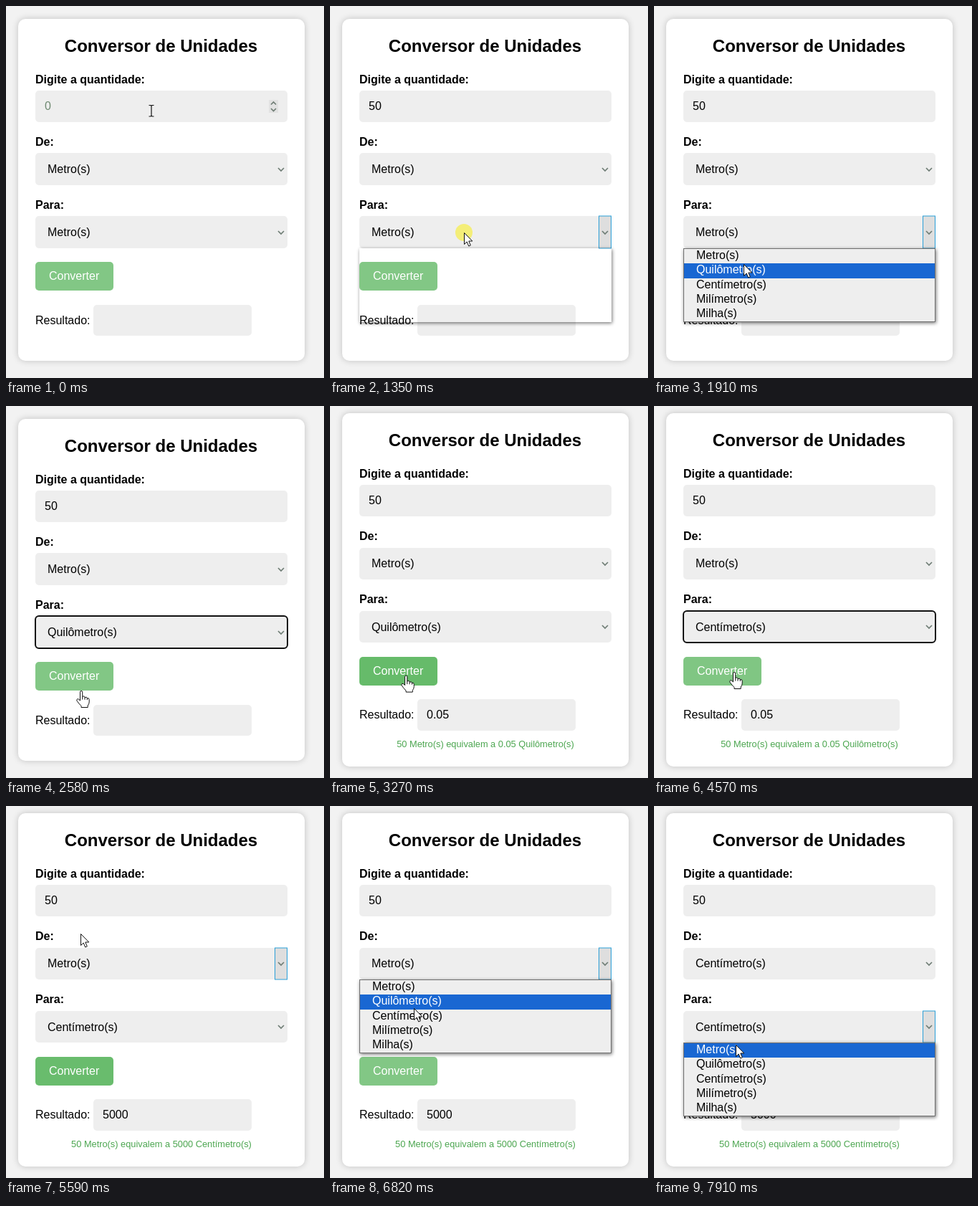
Write an HTML page that moves like this. It is 444 by 519 pixels and loops after 8 s.

```html
<!DOCTYPE html>
<html lang="pt">
<head>
<meta charset="utf-8">
<title>Conversor de Unidades</title>
<style>
  html, body { margin: 0; width: 100%; height: 100%; overflow: hidden; background: #f2f2f2; }
  svg { display: block; }
  text { font: 16px "Liberation Sans", Arial, sans-serif; fill: #000; }
  .bold { font-weight: bold; }
  .title { font-size: 24px; font-weight: bold; text-anchor: middle; }
  .note { font-size: 12.8px; fill: #4ca650; text-anchor: middle; }
  .light { fill: #fff; }
  .field { fill: #eee; }
  .chevron { fill: none; stroke: #6f7d75; stroke-width: 1.7; }
  .ring { fill: none; stroke: #101010; stroke-width: 2; }
  .arrow { fill: #dedede; stroke: #2a9fd8; }
</style>
</head>
<body>
<svg id="stage" width="444" height="519" viewBox="0 0 444 519">
  <defs>
    <filter id="soft" x="-10%" y="-10%" width="120%" height="120%"><feGaussianBlur stdDeviation="5"/></filter>
    <filter id="tight" x="-10%" y="-20%" width="120%" height="140%"><feGaussianBlur stdDeviation="2.5"/></filter>
    <clipPath id="outside"><path clip-rule="evenodd" d="M-20-20H372V123H-20ZM0 0V103H352V0Z"/></clipPath>
  </defs>
</svg>
<script>
const LOOP = 8000;
const UNITS = ['Metro(s)', 'Quilômetro(s)', 'Centímetro(s)', 'Milímetro(s)', 'Milha(s)'];
const stage = document.getElementById('stage');

function add(tag, attrs, parent = stage, content = '') {
  const el = document.createElementNS('http://www.w3.org/2000/svg', tag);
  set(el, attrs);
  el.textContent = content;
  parent.appendChild(el);
  return el;
}
function set(el, attrs) {
  for (const k in attrs) el.setAttribute(k, attrs[k]);
}
function show(el, on) {
  el.style.display = on ? '' : 'none';
}

// Items that move up when the result note makes the card taller
const movers = [];
function box(x, top, bottom, width, cls, parent) {
  const el = add('rect', { x, width, rx: 5, class: cls }, parent);
  movers.push(dy => {
    const y = Math.round(top - dy);
    set(el, { y, height: Math.round(bottom - dy) - y });
  });
  return el;
}
function label(x, y, content, cls = '') {
  const el = add('text', { x, class: cls }, stage, content);
  movers.push(dy => el.setAttribute('y', Math.round(y - dy)));
  return el;
}
function ring(top, bottom) {
  return box(41, top, bottom, 352, 'ring');
}

const glow = add('rect', { x: 17, width: 400, rx: 10, fill: '#000', opacity: .2, filter: 'url(#soft)' });
const card = add('rect', { x: 17, width: 400, rx: 10, fill: '#fff' });

label(216.5, 64, 'Conversor de Unidades', 'title');
label(41, 108, 'Digite a quantidade:', 'bold');
box(41, 118, 162, 352, 'field');
const amount = label(54, 145, '0');
const caret = add('rect', { y: 131, width: 1, height: 17 });
const inputRing = ring(118, 162);
const spinner = add('g', {});
add('rect', { x: 367, y: 131, width: 13, height: 18, fill: '#e2e2e2' }, spinner);
add('path', { d: 'M370 137.5l3.5-3.5 3.5 3.5M370 143l3.5 3.5 3.5-3.5', class: 'chevron' }, spinner);

function select(name, labelY, top, bottom, textY) {
  label(41, labelY, name, 'bold');
  box(41, top, bottom, 352, 'field');
  const arrow = box(375.5, top, bottom, 17, 'arrow');
  arrow.setAttribute('rx', 0);
  const text = label(58, textY, '');
  const chevron = add('path', { d: 'M-4-2L0 2 4-2', class: 'chevron' });
  movers.push(dy => chevron.setAttribute('transform',
    `translate(384 ${Math.round((top + bottom) / 2 - dy)})`));
  return { text, arrow, ring: ring(top, bottom) };
}
const from = select('De:', 195, 205.4, 249.6, 232.9);
const to = select('Para:', 283, 293.4, 337.7, 321.3);

const button = box(41, 357.4, 397.4, 109, '');
label(60, 382.3, 'Converter', 'light');
label(41, 444, 'Resultado:');
box(122, 417, 460.4, 221, 'field');
const result = label(135, 444, '');
const note = add('text', { x: 217, y: 476, class: 'note' });

const popup = add('g', {});
const shade = add('g', { 'clip-path': 'url(#outside)' }, popup);
add('rect', { x: 1, y: 1.5, width: 352, height: 103, opacity: .55, filter: 'url(#tight)' }, shade);
const list = add('g', {}, popup);
add('rect', { x: .5, y: .5, width: 351, height: 102, fill: '#eee', stroke: '#707070' }, list);
const mark = add('rect', { x: 1, width: 350, fill: '#1967d2' }, list);
const rowTop = i => Math.round(1 + 20.3 * i);
const rows = UNITS.map((u, i) => add('text', { x: 18, y: 14 + rowTop(i) }, list, u));

const pointer = add('g', {});
const spot = add('circle', { r: 12, fill: '#f5ee5a', opacity: .8 }, pointer);
const shapes = {
  beam: add('path', { d: 'M-3.5-7.5h2.5l1 1 1-1h2.5M0-7V7.5M-3.5 8h2.5l1-1 1 1h2.5',
    fill: 'none', stroke: '#111', 'stroke-width': 1.2 }, pointer),
  arrow: add('path', { d: 'M.5.5V16.5L4.2 13l2.5 6 2.6-1.1L6.8 12h5z',
    fill: '#fff', stroke: '#111', 'stroke-linejoin': 'round' }, pointer),
  hand: add('path', { d: 'M-1.5 14V2Q-1.5 .5 0 .5T1.7 2V8Q3-0 0 8M1.7 8Q4.8 6.5 5 9.5 8 8 8.3 10.5 11 9.5 11.2 12.5V16Q11 19 9 21V23.5H0V21.5Q-3 18-5.5 14.5-6-12-5.5 14.5-6.5 12.5-5 11.7-3.5 11.5-1.5 14M5 9.5V13M8.3 10.5V13',
    fill: '#fff', stroke: '#111', 'stroke-linejoin': 'round' }, pointer)
};
shapes.hand.setAttribute('d', 'M-1.5 14V2.2Q-1.5 .5 .1 .5T1.7 2.2V8.5Q4.8 6.8 5 9.7 8 8.2 8.3 10.7 11 9.8 11.2 12.7V16Q11 19 9.2 21V23.5H0V21.5Q-3.5 18-6 14.3-6.8 12.3-5.2 11.7-3.5 11.5-1.5 14M1.7 8.5V12.5M5 9.7V12.7M8.3 10.7V13');

// Time and point of the pointer's stops
const PATH = [
  [0, 203, 146], [800, 203, 146], [1290, 187, 316], [1420, 187, 316],
  [1560, 175, 338], [1630, 175, 338], [1910, 125, 360], [2170, 125, 360],
  [2580, 105, 397], [2650, 105, 397], [2920, 106, 376], [3250, 106, 376],
  [3700, 128, 312], [3800, 128, 312], [3870, 126, 357], [3950, 126, 357],
  [4150, 122, 376], [4220, 122, 376], [4570, 112, 371], [5450, 112, 371],
  [5585, 104, 178], [5660, 104, 178], [5940, 112, 218], [6190, 112, 218],
  [6810, 117, 282], [6890, 117, 282], [7060, 118, 294], [7230, 118, 294],
  [7600, 118, 311], [7840, 118, 311], [7905, 114, 333], [8000, 114, 333]
];
const CLICKS = [200, 1290, 2100, 2900, 3700, 4160, 4590, 6000, 7160, 7600];

// Popup: start, first list, end, owner, and changes of the marked row
const POPUPS = [
  [1350, 1420, 2170, to, [[0, 0], [1770, 1]]],
  [3820, 3880, 4220, to, [[0, 0], [3955, 1], [4090, 2]]],
  [6120, 6190, 7230, from, [[0, 0], [6680, 1], [6960, 2]]],
  [7640, 7710, LOOP, to, [[0, 2], [7840, 1], [7905, 0]]]
];

const within = (t, a, b) => t >= a && t < b;
const clamp = v => Math.max(0, Math.min(1, v));
function at(t, steps) {
  let value;
  for (const [start, v] of steps) if (t >= start) value = v;
  return value;
}
function position(t) {
  const i = Math.max(1, PATH.findIndex(p => p[0] > t));
  const [t0, x0, y0] = PATH[i - 1], [t1, x1, y1] = PATH[i];
  const u = (t - t0) / (t1 - t0), e = u * u * (3 - 2 * u);
  return [x0 + (x1 - x0) * e, y0 + (y1 - y0) * e];
}
function hoverColor(t) {
  const fade = start => clamp((t - start) / 300);
  const k = fade(2600) - fade(3380) + fade(4550) - fade(5560);
  const mix = (a, b) => Math.round(a + (b - a) * k);
  return `rgb(${mix(130, 102)},${mix(199, 187)},${mix(133, 106)})`;
}

function draw(t) {
  const tall = t >= 2980;
  const frame = tall ? { y: 10, height: 493 } : { y: 18, height: 477 };
  set(card, frame);
  set(glow, frame);
  movers.forEach(move => move(tall ? 7.7 : 0));

  amount.textContent = at(t, [[0, '0'], [600, '5'], [800, '50']]);
  amount.style.fill = t < 600 ? '#6f8a72' : '#000';
  caret.setAttribute('x', at(t, [[0, 54], [600, 62], [800, 71]]));
  show(caret, within(t, 200, 1290));
  show(inputRing, within(t, 200, 1290));
  show(spinner, t < 1290);

  from.text.textContent = UNITS[t < 7230 ? 0 : 2];
  to.text.textContent = UNITS[at(t, [[0, 0], [2170, 1], [4220, 2]])];
  show(from.ring, within(t, 7230, 7640));
  show(to.ring, within(t, 2170, 2980) || within(t, 4220, 4650));
  show(from.arrow, within(t, 5520, 7230));
  show(to.arrow, within(t, 1220, 2170) || within(t, 3540, 4220) || t >= 7500);

  button.style.fill = hoverColor(t);
  const value = at(t, [[0, ''], [2980, '0.05'], [4650, '5000']]);
  result.textContent = value;
  note.textContent = value && `50 Metro(s) equivalem a ${value} ${UNITS[t < 4650 ? 1 : 2]}`;

  const open = POPUPS.find(p => within(t, p[0], p[2]));
  show(popup, open);
  if (open) {
    const [, ready, , owner, marks] = open;
    const row = at(t, marks);
    const y = owner === from ? 242 : tall ? 330 : 338;
    popup.setAttribute('transform', `translate(41 ${y})`);
    show(list, t >= ready);
    set(mark, { y: rowTop(row), height: rowTop(row + 1) - rowTop(row) });
    rows.forEach((r, i) => r.setAttribute('class', i === row ? 'light' : ''));
  }

  const [x, y] = position(t);
  pointer.setAttribute('transform', `translate(${x.toFixed(1)} ${y.toFixed(1)})`);
  const kind = at(t, [[0, 'beam'], [920, 'arrow'], [2550, 'hand'], [3400, 'arrow'],
    [4430, 'hand'], [5500, 'arrow']]);
  for (const k in shapes) show(shapes[k], k === kind);
  show(spot, CLICKS.some(c => within(t, c, c + 130)));
}

const start = performance.now();
function tick() {
  draw((performance.now() - start) % LOOP);
  requestAnimationFrame(tick);
}
tick();
</script>
</body>
</html>
```
